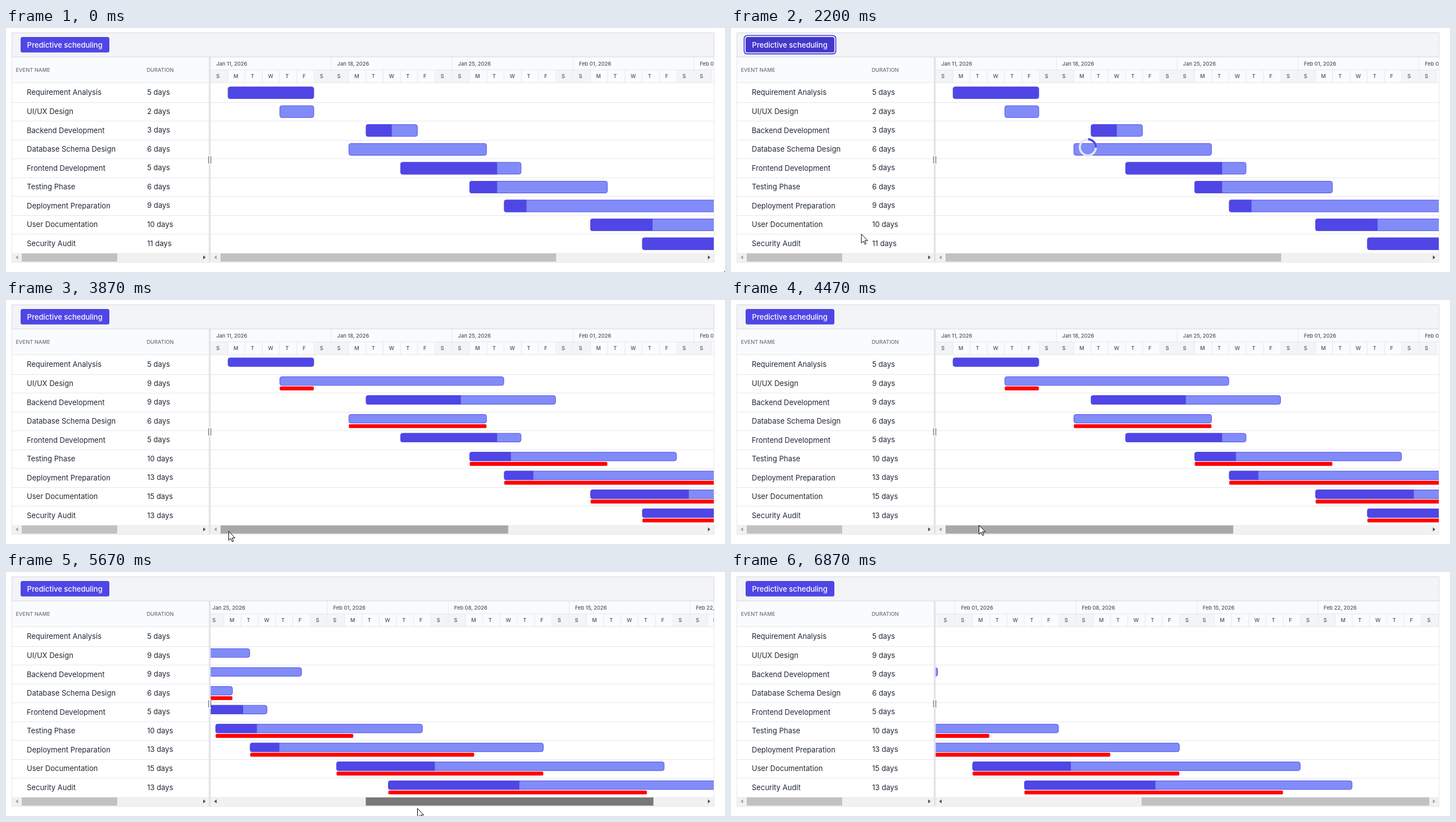
Write an HTML page that moves like this. It is 1280 px wide and 434 px high and loops after 8000 ms.

```html
<!DOCTYPE html>
<html lang="en">
<head>
<meta charset="utf-8">
<title>Predictive scheduling</title>
<style>
  html, body { margin: 0; width: 100%; height: 100%; overflow: hidden; background: #fff; }
  svg { display: block; width: 1280px; height: 434px; font-family: Inter, sans-serif; }
  .cell { font-size: 13.04px; fill: #1f2937; }
  .head { font-size: 9.32px; font-weight: 500; fill: #6b7280; }
  .date { font-size: 9.32px; font-weight: 500; fill: #4b5563; }
  .btn { font-size: 13.04px; font-weight: 500; fill: #fff; }
  .line { fill: #e5e7eb; }
  .track { fill: #f1f1f1; }
  .bar { fill: #818cf8; stroke: #4f46e5; stroke-width: .93; }
  .done { fill: #4f46e5; }
  .base { fill: #f00; }
</style>
</head>
<body>
<svg viewBox="0 0 1280 434">
  <defs>
    <clipPath id="pane"><rect x="364" y="52" width="896" height="348"/></clipPath>
  </defs>
  <rect x="10.5" y="8.5" width="1250" height="43" fill="#f3f4f6" stroke="#d6d9de"/>
  <g id="ring">
    <rect x="22.5" y="12.5" width="165" height="34.4" rx="6" fill="#4f46e5"/>
    <rect x="24.4" y="14.3" width="161.2" height="30.8" rx="4.6" fill="#fff"/>
  </g>
  <rect id="button" x="26" y="16" width="158" height="27.6" rx="3.7"/>
  <text class="btn" x="37.6" y="34.6">Predictive scheduling</text>

  <rect x="11" y="52" width="1249" height="45" fill="#f9fbfc"/>
  <text class="head" x="17.4" y="78.1">EVENT NAME</text>
  <text class="head" x="250.4" y="78.1">DURATION</text>
  <g id="rows"></g>
  <g clip-path="url(#pane)">
    <g id="header"></g>
    <g id="before"></g>
    <g id="after"></g>
  </g>
  <rect class="line" x="11" y="97" width="1249" height="1"/>
  <rect class="line" x="364" y="74" width="896" height="1"/>

  <rect class="track" x="11" y="400" width="1249" height="17"/>
  <rect id="thumbL" x="28" y="401" width="170" height="14.5"/>
  <rect id="thumbR" y="401" height="14.5"/>
  <path d="M21.5 404.5v7l-4.5-3.5z" fill="#a3a3a3"/>
  <path d="M351 404.5v7l4.5-3.5z" fill="#505050"/>
  <path id="arrowL" d="M375 404.5v7l-4.5-3.5z"/>
  <path id="arrowR" d="M1249.5 404.5v7l4.5-3.5z"/>

  <rect x="361" y="52" width="3.4" height="365" fill="#e2e4e8"/>
  <rect x="360" y="226" width="5" height="17" fill="#f9fafb"/>
  <path d="M360.8 228v13M364.6 228v13" stroke="#6b7280" stroke-width="1.3"/>
  <path d="M10.5 52V417M1260.5 52V417M10 416.8H1261" fill="none" stroke="#e5e7eb"/>

  <g id="spinner" fill="none" stroke-width="3.8">
    <circle r="14.3" stroke="#e3e6f2"/>
    <circle id="arc" r="14.3" stroke="#4f46e5" pathLength="4" stroke-dasharray="1 3"/>
  </g>
  <g stroke="#000" stroke-linejoin="round">
    <path id="pointer" fill="#fff" d="M.5.5V16.6L4.2 13.1 6.7 18.8 9 17.8 6.6 12.2H11.7Z"/>
    <g id="hand">
      <path fill="#fff" d="M4.6 13V2a1.6 1.6 0 0 1 3.2 0V8.2C8.2 7 10.4 7 10.6 8.6 11.2 7.6 13.1 7.8 13.3 9.4 14.2 8.6 16 9 16 10.8V14.5C16 17 14.5 18.5 14.2 21.5H6.8C6.5 19 3.5 16.5 1.2 13 0 11 2 9.8 3.2 11.2Z"/>
      <path fill="none" d="M7.8 8v3.5M10.6 8.6v3M13.3 9.4v2.6"/>
    </g>
  </g>
</svg>
<script>
const LOOP = 8000, FPS = 15;
const LEFT = 364, VIEW = 896, DAY = 30.743, TOP = 98, ROW = 33.56;
const TRACK_X = 382, TRACK = 861;
const $ = id => document.getElementById(id);

// name, first day, old span, new span (calendar days), progress, old and new working days, late
const tasks = [
  ['Requirement Analysis', 1, 5, 5, 1, 5, 5, 0],
  ['UI/UX Design', 4, 2, 13, 0, 2, 9, 1],
  ['Backend Development', 9, 3, 11, .5, 3, 9, 0],
  ['Database Schema Design', 8, 8, 8, 0, 6, 6, 1],
  ['Frontend Development', 11, 7, 7, .8, 5, 5, 0],
  ['Testing Phase', 15, 8, 12, .2, 6, 10, 1],
  ['Deployment Preparation', 17, 13, 17, .1, 9, 13, 1],
  ['User Documentation', 22, 12, 19, .3, 10, 15, 1],
  ['Security Audit', 25, 15, 19, .4, 11, 13, 1]
];
const weeks = ['Jan 11', 'Jan 18', 'Jan 25', 'Feb 01', 'Feb 08', 'Feb 15', 'Feb 22'];

const rect = (cls, x, y, w, h, more = '') =>
  `<rect class="${cls}" x="${x}" y="${y}" width="${w}" height="${h}" ${more}/>`;
const text = (cls, x, y, s) => `<text class="${cls}" x="${x}" y="${y}">${s}</text>`;

function bar(x, y, w, h, p) {
  const r = 3.7, end = x + w * p;
  let s = rect('bar', x + .5, y + .5, w - 1, h - 1, `rx="${r}"` + (p === 1 ? ' style="fill:#4f46e5"' : ''));
  if (p > 0 && p < 1)
    s += `<path class="done" d="M${end} ${y}H${x + r}Q${x} ${y} ${x} ${y + r}V${y + h - r}Q${x} ${y + h} ${x + r} ${y + h}H${end}Z"/>`;
  return s;
}

function build() {
  let rows = '', before = '', after = '', head = '';
  tasks.forEach(([name, day, span, newSpan, p, days, newDays, late], i) => {
    const y = TOP + i * ROW, x = LEFT + day * DAY;
    if (i < 8) {
      const ly = Math.round(y + ROW);
      rows += rect('line', 11, ly, 350, 1) + rect('line', LEFT, ly, VIEW, 1);
    }
    rows += text('cell', 37, y + 21.4, name) +
      `<text class="cell days" x="251.2" y="${y + 21.1}" data-old="${days} days" data-new="${newDays} days"></text>`;
    before += bar(x, y + 6.2, span * DAY, 22, p);
    after += bar(x, y + 4.4, newSpan * DAY, 16.4, p);
    if (late) after += rect('base', x + .4, y + 22.2, span * DAY - .9, 6.9, 'rx="1.9"');
  });
  for (let d = 0; d < 49; d++) {
    const x = LEFT + d * DAY;
    if (d % 7 === 0 || d % 7 === 6) head += `<rect x="${x}" y="75" width="${DAY}" height="22" fill="#f3f4f6"/>`;
    if (d % 7 === 0) head += rect('line', x - .5, 52, 1, 23) + text('date', x + 10.4, 66.9, weeks[d / 7] + ', 2026');
    head += rect('line', x + DAY - .5, 75, 1, 22) + text('date', x + 10.2, 89.3, 'SMTWTFS'[d % 7]);
  }
  $('rows').innerHTML = rows;
  $('before').innerHTML = before;
  $('after').innerHTML = after;
  $('header').innerHTML = head;
}

// Each key is [step, values...]
function track(keys, n) {
  const i = keys.findIndex(k => k[0] >= n);
  if (i < 0) return keys[keys.length - 1].slice(1);
  if (i === 0) return keys[0].slice(1);
  const a = keys[i - 1], b = keys[i], f = (n - a[0]) / (b[0] - a[0]);
  return a.slice(1).map((v, j) => v + (b[j + 1] - v) * f);
}

const drag = [[77, 0], [78, 55], [79, 112], [80, 147], [85, 258.5], [90, 349]];
const visits = [
  [[0, 1278.5, 432.5], [1, 820, 318], [2, 470, 241], [5, 470, 241], [7, 395, 190], [10, 235, 92], [12, 160, 48],
    [14, 136, 34.5], [26, 136, 34.5], [28, 150, 70], [31, 205, 250], [34, 245, 424]],
  [[55, 363, 430], [58, 396, 411], [60, 418, 402], [62, 432, 397], [65, 432, 397], [67, 441, 400], [72, 456, 404],
    [77, 456, 404], [78, 511, 408], [80, 603, 415], [85, 732, 420], [90, 840, 431]],
  [[96, 872, 428], [99, 470, 416], [101, 170, 403], [102, 62, 390]]
];

const show = (id, on) => $(id).style.display = on ? '' : 'none';
const move = (id, x, y = 0) => $(id).setAttribute('transform', `translate(${x} ${y})`);
const fill = (id, c) => $(id).setAttribute('fill', c);
const over = (p, x0, y0, x1, y1) => p && p[0] >= x0 && p[0] <= x1 && p[1] >= y0 && p[1] <= y1;

let last = -1;
function draw(n) {
  const done = n >= 49, busy = n >= 22 && !done;
  const visit = visits.find(v => n >= v[0][0] && n <= v[v.length - 1][0]);
  const tip = visit && track(visit, n);
  const onButton = over(tip, 26, 16, 184, 44);

  fill('button', n >= 20 && n < 22 ? '#3730a3' : n >= 22 && n < 35 ? '#4338ca' : '#4f46e5');
  show('ring', busy);
  show('spinner', busy);
  move('spinner', 635.3, 212.3);
  const turn = Math.min(n, 46) + (n > 47) - 47;
  $('arc').setAttribute('transform', `rotate(${-112 + 24 * turn})`);

  show('before', !done);
  show('after', done);
  document.querySelectorAll('.days').forEach(e => e.textContent = done ? e.dataset.new : e.dataset.old);

  const total = (done ? 49 : 42) * DAY, width = TRACK * VIEW / total, ratio = total / TRACK;
  const pos = track(drag, n)[0], step = pos - track(drag, n - 1)[0];
  move('after', -pos * ratio);
  move('header', -(pos - .38 * step) * ratio); // header trails the body while scrolling
  const x = TRACK_X + pos;
  $('thumbR').setAttribute('x', x);
  $('thumbR').setAttribute('width', width);
  const pressed = n >= 75 && n < 91;
  const hover = n === 91 || over(tip, x, 400, x + width, 416);
  fill('thumbR', pressed ? '#787878' : hover ? '#a8a8a8' : '#c1c1c1');
  fill('thumbL', over(tip, 28, 400, 198, 416) ? '#a8a8a8' : '#c1c1c1');
  fill('arrowL', pos > 0 ? '#505050' : '#a3a3a3');
  fill('arrowR', pos < 349 ? '#505050' : '#a3a3a3');

  show('pointer', tip && !onButton);
  show('hand', onButton);
  if (tip) {
    move('pointer', ...tip);
    move('hand', tip[0] - 6, tip[1]);
  }
}

function tick(now) {
  const n = Math.floor((now % LOOP + 4) * FPS / 1000) % (LOOP * FPS / 1000);
  if (n !== last) draw(last = n);
  requestAnimationFrame(tick);
}

build();
draw(0);
const start = performance.now();
requestAnimationFrame(() => {
  const loop = () => { tick0(); requestAnimationFrame(loop); };
  const tick0 = () => {
    const t = Math.max(0, performance.now() - start) % LOOP;
    const n = Math.floor((t + 4) * FPS / 1000) % (LOOP * FPS / 1000);
    if (n !== last) draw(last = n);
  };
  loop();
});
</script>
</body>
</html>
```
